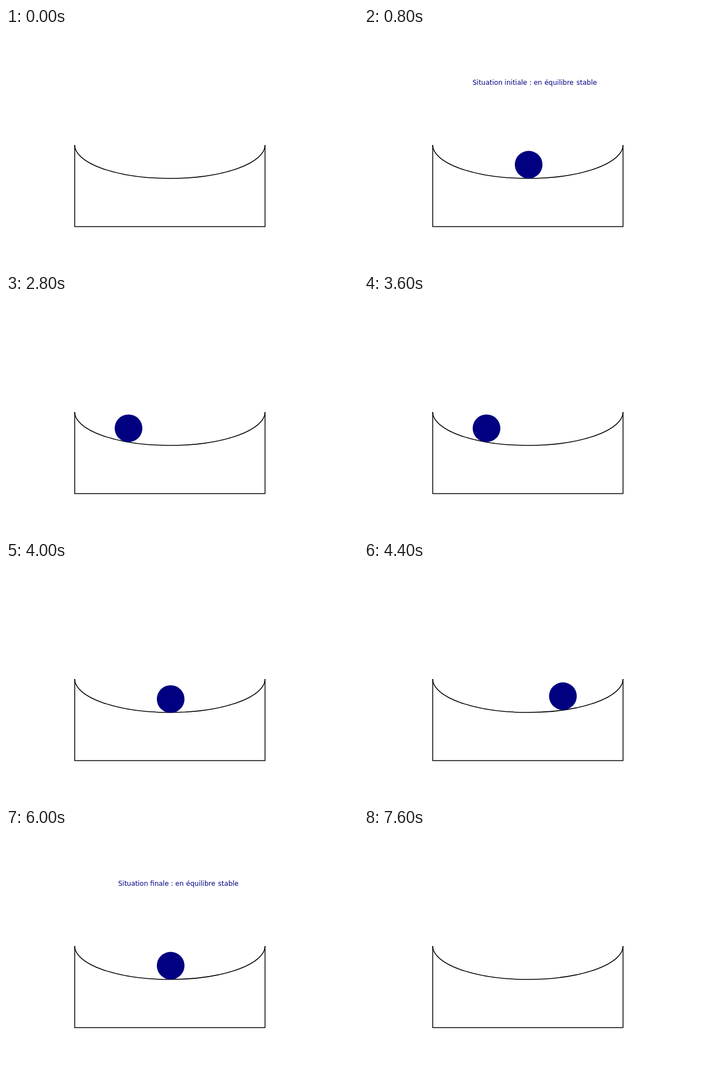
An HTML page for the animation above (8400 ms loop, 630 by 429 pixels).

```html
<!DOCTYPE html>
<html lang="fr">
<head>
<meta charset="utf-8">
<title>Équilibre stable</title>
<style>
  html, body { margin: 0; width: 100%; height: 100%; overflow: hidden; background: #fff; }
  svg { display: block; width: 630px; height: 429px; }
  text { font: 12px "DejaVu Sans", sans-serif; fill: #000080; white-space: pre; }
  .bowl { fill: none; stroke: #000; stroke-width: 1.5; }
</style>
</head>
<body>
<svg viewBox="0 0 630 429">
  <path class="bowl" d="M123 210V356.6H463.6V210"/>
  <path class="bowl" d="M123 210A170.3 60 0 0 0 463.6 210"/>
  <circle id="ball" r="24.8" fill="#000080"/>
  <text id="label" y="102"><tspan id="lead"></tspan><tspan dx=".5">équilibre </tspan><tspan dx="1.2">stable</tspan></text>
</svg>
<script>
  const LOOP = 8400;
  const START = { x: 194.2, lead: "Situation initiale : en " };
  const END = { x: 200.7, lead: "Situation finale : en " };

  // [start in ms, ball x, ball y, caption]
  const steps = [
    [0],
    [800, 294.7, 245.3, START],
    [2400, 294.7, 246],
    [2800, 219.3, 239.2],
    [3200, 163.2, 222],
    [3600, 219.3, 239.2],
    [4000, 294.7, 246],
    [4400, 356, 240.8],
    [4800, 249, 243.5],
    [5200, 324, 244.6],
    [5600, 294.7, 246],
    [6000, 294.7, 245.3, END],
    [7600]
  ];

  const [ball, label, lead] = ["ball", "label", "lead"].map(id => document.getElementById(id));
  const show = (el, on) => el.setAttribute("visibility", on ? "visible" : "hidden");
  let current;

  function draw(step) {
    const [, x, y, caption] = step;
    show(ball, x !== undefined);
    show(label, caption);
    if (x !== undefined) {
      ball.setAttribute("cx", x);
      ball.setAttribute("cy", y);
    }
    if (caption) {
      label.setAttribute("x", caption.x);
      lead.textContent = caption.lead;
    }
  }

  const origin = performance.now();
  function tick() {
    const t = (performance.now() - origin) % LOOP;
    const step = steps.filter(s => s[0] <= t).pop();
    if (step !== current) draw(current = step);
    requestAnimationFrame(tick);
  }
  tick();
</script>
</body>
</html>
```
